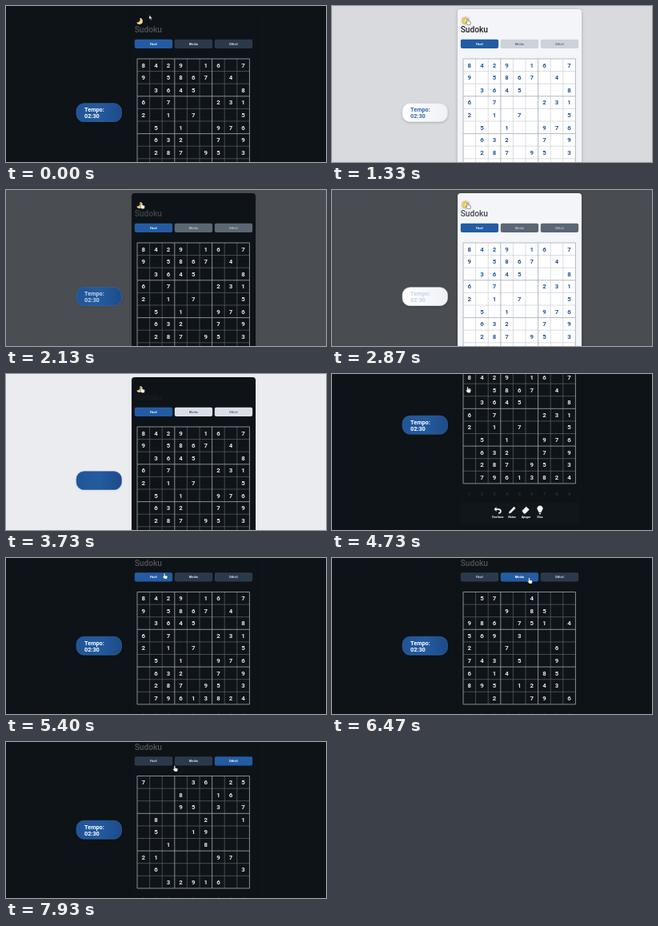
An HTML page for the animation above (8 s loop, 400 by 195 pixels).

```html
<!DOCTYPE html>
<html lang="pt">
<head>
<meta charset="utf-8">
<title>Sudoku</title>
<style>
html, body { margin: 0; width: 100%; height: 100%; overflow: hidden; }
svg { display: block; width: 100%; height: 100%; background: var(--body); font-family: Roboto, Arial, sans-serif; font-weight: 700; }
svg {
  --card: #0e1317; --cell: #0f1418; --digit: #e6e8ea; --thin: #5f6468; --thick: #979b9f;
  --edge: #3a6aa6; --pad: #353a40; --panel: #11161b; --icon: #f4f5f6; --shade: #0001; --halo: #0e1317;
}
svg.light {
  --card: #f4f5f9; --cell: #fff; --digit: #20559e; --thin: #c9ced6; --thick: #aab1bc;
  --edge: #dce1e9; --pad: #8b95a5; --panel: #e9ecf1; --icon: #20559e; --shade: #0003; --halo: #d9dce2;
}
.card { fill: var(--card); filter: drop-shadow(0 1px 2px var(--shade)); }
.timer { stroke: var(--edge); stroke-width: .6; filter: drop-shadow(0 1px 1.5px var(--shade)); }
.cells { fill: var(--cell); }
.thin { stroke: var(--thin); stroke-width: .7; }
.thick { stroke: var(--thick); stroke-width: .9; }
.digits { fill: var(--digit); font-size: 7.8px; text-anchor: middle; }
.pad { fill: var(--pad); font-size: 6px; font-weight: 400; text-anchor: middle; }
.label { font-size: 4px; text-anchor: middle; }
.tools { fill: var(--icon); }
.tools text { font-size: 3.6px; text-anchor: middle; }
.pointer { fill: #fff; stroke: #17191c; stroke-width: .4; stroke-linejoin: round; }
</style>
</head>
<body>
<svg id="stage" viewBox="0 0 400 195" preserveAspectRatio="none">
  <defs>
    <linearGradient id="blue"><stop stop-color="#205598"/><stop offset=".5" stop-color="#235b9f"/><stop offset="1" stop-color="#1d4b88"/></linearGradient>
    <linearGradient id="white"><stop stop-color="#fff"/><stop offset="1" stop-color="#eef1f6"/></linearGradient>
  </defs>
  <g id="page">
    <rect class="card" x="157" y="4" width="155" height="256" rx="4"/>
    <circle cx="167" cy="18.5" r="6" fill="var(--halo)"/>
    <path id="moon" d="M167.3 14.9a4 4 0 1 1-4.100 5.500c3.100.5 5.200-2.300 4.100-5.500z" fill="#f6d878"/>
    <g id="sun">
      <circle cx="166.8" cy="18.5" r="4" fill="#e9b93c"/>
      <circle cx="166.8" cy="18.5" r="2.8" fill="#f7d867"/>
    </g>
    <text x="160.7" y="33.3" font-size="10.2" font-weight="500" fill="var(--title)">Sudoku</text>
    <g id="levels"></g>
    <g id="board"></g>
    <g class="tools" id="tools">
      <rect x="161" y="230" width="147" height="26.5" rx="2" fill="var(--panel)"/>
      <path d="M205.500 235.500l-3 3 3 3v-2h2.500q2 0 2 1.500t-2 1.800v1.500q3.700-.3 3.700-3.400t-3.700-3.200h-2.500z"/>
      <path d="M221 244l.7-2.800 5.800-5.900 2 2-5.900 5.900z"/>
      <path d="M237.500 240.500l5.200-5.200 4 3.800-5 5h-2z"/>
      <path d="M258.500 242.500q-.2-1.500-1.200-2.600a3.500 3.500 0 1 1 5.400 0q-1 1.100-1.200 2.600zM258.600 243.200h2.800l-.5 1.500h-1.800z"/>
    </g>
    <rect class="timer" id="timer" x="88" y="121.7" width="56.5" height="23" rx="9.5"/>
    <g font-size="7.3" fill="var(--clock)"><text x="98" y="132">Tempo:</text><text x="98" y="140">02:30</text></g>
  </g>
  <g id="cursor" class="pointer">
    <path id="arrow" d="M0 0v5.200l1.300-1.100.9 1.900.9-.4-.9-1.900h1.700z"/>
    <path id="hand" d="M-.8.600q.8-1.100 1.600 0v2.300l2.400.6q.9.200.8 1.100L3.400 7.600H.1L-2.200 4.700q-.1-1 .8-.6l.6.500z"/>
  </g>
</svg>
<script>
const LOOP = 8000, FADE = 500, CELL = 15.6, LEFT = 164, TOP = 66;
const toggles = [980, 1890, 2800, 3730];
const picks = [0, 5750, 6880];
const scrollKeys = [[4400, 0], [4680, 69.5], [4880, 69.5], [5180, 23.5]];
const cursorKeys = [
  [0, 179, 11.5], [350, 172, 14], [700, 169.5, 16], [5180, 169.5, 16], [5650, 232, 22],
  [6250, 236, 23], [6470, 246.5, 24.5], [6780, 284, 22], [7250, 284, 22], [7870, 231, 28], [7930, 210.8, 29.5]
];
const boards = [
  "8429.16.7 9.5867.4. .3645...8 6.7...231 2.1.7...5 .5.1..976 .632..7.9 .287.95.3 .79613824",
  ".57..4... ...9.85.. 986.751.4 569.3.... 2..7...6. 743.5..9. 6.14..85. 895.1243. ..2..79.6",
  "7...36.25 ...8..16. ...95.3.7 .8...2..1 .5..19... ..1..8... 21....97. .6......3 ..32916.."
].map(rows => rows.replaceAll(" ", ""));
// dark colour, light colour
const fades = {
  "--body": [[14, 19, 23], [236, 237, 241]],
  "--title": [[80, 84, 90], [27, 29, 33]],
  "--clock": [[255, 255, 255], [35, 91, 160]]
};
const idle = [[43, 58, 74], [221, 225, 231]];
const idleText = [[214, 220, 226], [75, 103, 143]];
const active = [35, 92, 162], activeText = [255, 255, 255];

const $ = id => document.getElementById(id);
const stage = $("stage");
function add(parent, tag, attrs, text = "") {
  const el = document.createElementNS(stage.namespaceURI, tag);
  for (const key in attrs) el.setAttribute(key, attrs[key]);
  el.textContent = text;
  return parent.appendChild(el);
}
const mix = (a, b, p) => a.map((v, i) => v + (b[i] - v) * p);
const rgb = c => `rgb(${c.map(Math.round)})`;
const clamp = p => Math.min(1, Math.max(0, p));
const easeOut = p => 1 - (1 - clamp(p)) ** 2;
const smooth = p => p * p * (3 - 2 * p);
const show = (id, on) => $(id).setAttribute("visibility", on ? "visible" : "hidden");

function sample(keys, t) {
  const next = keys.findIndex(k => k[0] > t);
  if (next === 0) return keys[0].slice(1);
  if (next < 0) return keys.at(-1).slice(1);
  const a = keys[next - 1], b = keys[next];
  return mix(a.slice(1), b.slice(1), smooth((t - a[0]) / (b[0] - a[0])));
}

const levels = ["Fácil", "Médio", "Difícil"].map((name, i) => {
  const x = 160.8 + i * 50;
  return {
    box: add($("levels"), "rect", { x, y: 41.7, width: 47.3, height: 11.2, rx: 1.8 }),
    label: add($("levels"), "text", { x: x + 23.6, y: 48.8, class: "label" }, name)
  };
});

const board = $("board"), size = CELL * 9;
add(board, "rect", { x: LEFT, y: TOP, width: size, height: size, class: "cells" });
for (const kind of ["thin", "thick"]) {
  for (let i = 0; i < 10; i++) {
    if ((i % 3 === 0) !== (kind === "thick")) continue;
    const x = LEFT + i * CELL, y = TOP + i * CELL;
    add(board, "path", { d: `M${x} ${TOP}v${size}M${LEFT} ${y}h${size}`, class: kind });
  }
}
const centre = col => LEFT + (col + .5) * CELL;
const digits = add(board, "g", { class: "digits" });
const cells = Array.from(boards[0], (_, i) => add(digits, "text", {
  x: centre(i % 9), y: TOP + (Math.floor(i / 9) + .5) * CELL + 2.7
}));
const pad = add(board, "g", { class: "pad" });
for (let i = 0; i < 9; i++) add(pad, "text", { x: centre(i), y: 221.8 }, i + 1);
["Desfazer", "Notas", "Apagar", "Dica"].forEach((name, i) =>
  add($("tools"), "text", { x: 207.5 + i * 17.5, y: 249.2 }, name));

let shown = -1;
function render(t) {
  const past = toggles.filter(k => k <= t);
  const light = past.length % 2 === 1;
  const fade = past.length ? easeOut((t - past.at(-1)) / FADE) : 1;
  const lightness = light ? fade : 1 - fade;
  stage.classList.toggle("light", light);
  for (const name in fades) stage.style.setProperty(name, rgb(mix(...fades[name], lightness)));
  $("timer").setAttribute("fill", light ? "url(#white)" : "url(#blue)");
  show("sun", light);
  show("moon", !light);

  const level = picks.filter(k => k <= t).length - 1;
  const swap = level ? easeOut((t - picks[level] - 60) / FADE) : 1;
  levels.forEach(({ box, label }, i) => {
    const on = i === level ? swap : i === level - 1 ? 1 - swap : 0;
    box.setAttribute("fill", rgb(mix(mix(...idle, lightness), active, on)));
    label.setAttribute("fill", rgb(mix(mix(...idleText, lightness), activeText, on)));
  });
  if (level !== shown) {
    cells.forEach((cell, i) => cell.textContent = boards[level][i].replace(".", ""));
    shown = level;
  }

  $("page").setAttribute("transform", `translate(0 ${-sample(scrollKeys, t)[0]})`);
  $("cursor").setAttribute("transform", `translate(${sample(cursorKeys, t)})`);
  show("arrow", t < 400);
  show("hand", t >= 400);
}

const start = performance.now();
function tick() {
  render((performance.now() - start) % LOOP);
  requestAnimationFrame(tick);
}
tick();
</script>
</body>
</html>
```
